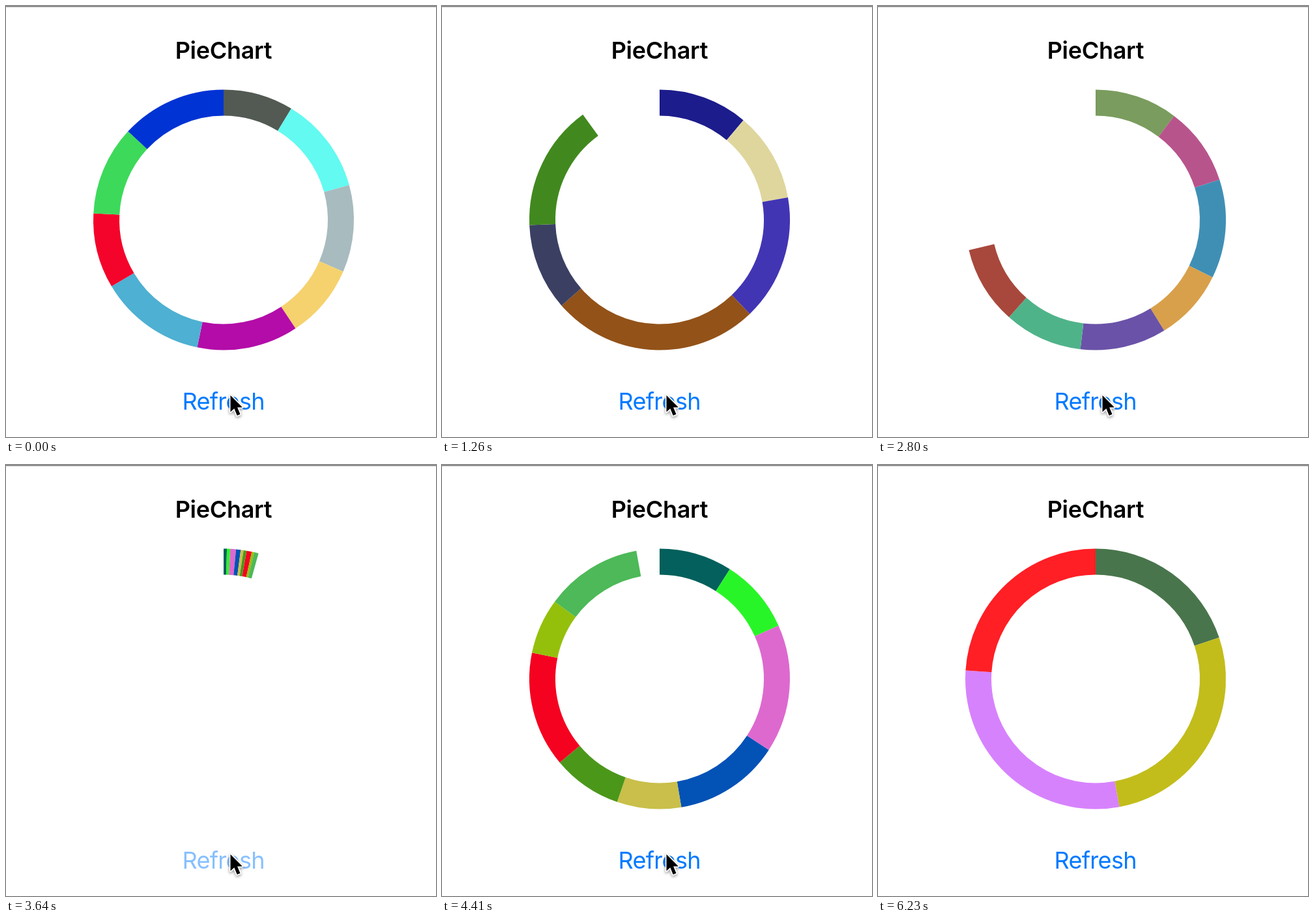
Animation of 660 by 662 pixels, one loop 6.3 s. Source, as an HTML page with a canvas:

```html
<!DOCTYPE html>
<html lang="en">
<head>
<meta charset="utf-8">
<title>PieChart</title>
<style>
  html, body { margin: 0; width: 100%; height: 100%; overflow: hidden; background: #fff; }
  canvas { display: block; }
</style>
</head>
<body>
<canvas id="stage" width="660" height="662"></canvas>
<script>
const ctx = document.getElementById('stage').getContext('2d');
const LOOP = 6300, STEP = 70, REVEAL = 1050;
const BLUE = '0,122,255';

// start: moment the button is released; ends: clockwise degrees where each slice stops
const charts = [
  { start: -REVEAL, ends: [31.3, 74.5, 113.4, 146.5, 191.7, 239.3, 272.9, 312.8, 360],
    colors: ['#525a53', '#62faf1', '#a8bbbe', '#f5d26d', '#b30ca8', '#4eb0d2', '#f4032a', '#3dd95b', '#0033d3'] },
  { start: 442, ends: [44.5, 89, 151.4, 254.3, 297.5, 360],
    colors: ['#1c1c8c', '#dfd69e', '#4235b3', '#935218', '#3b4063', '#41891e'] },
  { start: 2140, ends: [52, 101, 163, 208, 262, 311, 360],
    colors: ['#7a9c5e', '#b8548c', '#3f8fb5', '#d8a04a', '#6a52a8', '#4fb38a', '#a8483c'] },
  { start: 3486, ends: [33.6, 67.8, 126.7, 175.4, 204.9, 236.8, 289.9, 315.4, 360],
    colors: ['#03605c', '#28f528', '#dd69cf', '#0352b6', '#c9bf4a', '#4b971a', '#f40220', '#94c00b', '#4db958'] },
  { start: 5022, ends: [71.5, 169.5, 273.7, 360],
    colors: ['#49754c', '#c2bd1b', '#d782fd', '#ff1f25'] }
];

const clamp = x => Math.min(1, Math.max(0, x));

// cubic-bezier(.42, 0, .58, 1)
function easeInOut(x) {
  let lo = 0, hi = 1;
  for (let i = 0; i < 24; i++) {
    const s = (lo + hi) / 2, r = 1 - s;
    if (1.26 * s * r * r + 1.74 * s * s * r + s * s * s < x) lo = s; else hi = s;
  }
  return lo * lo * (3 - 2 * lo);
}

function drawRing(t) {
  const chart = charts.filter(c => c.start <= t).pop();
  const x = clamp((t - chart.start) / REVEAL);
  const scale = (x < 1 ? easeInOut(x) : 1) * Math.PI / 180;
  let from = 0;
  ctx.lineWidth = 40;
  chart.ends.forEach((end, i) => {
    ctx.strokeStyle = chart.colors[i];
    ctx.beginPath();
    ctx.arc(334, 328.5, 180, from * scale - Math.PI / 2, end * scale - Math.PI / 2);
    ctx.stroke();
    from = end;
  });
}

function buttonAlpha(t) {
  for (const { start } of charts.slice(1)) {
    if (t >= start - 110 && t < start + 300) return 0.2 + 0.8 * clamp((t - start - 80) / 220);
  }
  return 1;
}

function drawText(text, y, weight, spacing, color) {
  ctx.font = `${weight} 36px Inter, sans-serif`;
  ctx.letterSpacing = spacing + 'px';
  ctx.textAlign = 'center';
  ctx.fillStyle = color;
  ctx.fillText(text, 334 + spacing / 2, y);
}

function drawCursor(t) {
  const leave = clamp((t - 5350) / 210);
  if (leave === 1) return;
  ctx.save();
  ctx.translate(344.5 + 8 * leave, 598 + 70 * leave * leave);
  const arrow = new Path2D('M0 0V25.5L5.8 20.2L10.2 31L15 29L10.6 18.5H18.4Z');
  ctx.lineJoin = 'round';
  ctx.lineWidth = 3.5;
  ctx.strokeStyle = '#fff';
  ctx.shadowColor = 'rgba(0,0,0,.4)';
  ctx.shadowBlur = 4;
  ctx.shadowOffsetY = 2;
  ctx.stroke(arrow);
  ctx.shadowColor = 'transparent';
  ctx.fillStyle = '#000';
  ctx.fill(arrow);
  ctx.restore();
}

function draw(now) {
  const t = Math.floor(now % LOOP / STEP) * STEP;
  ctx.fillStyle = '#fff';
  ctx.fillRect(0, 0, 660, 662);
  ctx.fillStyle = '#808080';
  ctx.fillRect(0, 0, 660, 1.6);
  drawText('PieChart', 80.5, 600, -0.3, '#000');
  drawRing(t);
  drawText('Refresh', 620, 400, -0.7, `rgba(${BLUE},${buttonAlpha(t)})`);
  drawCursor(t);
  requestAnimationFrame(() => draw(performance.now()));
}
draw(performance.now());
</script>
</body>
</html>
```
